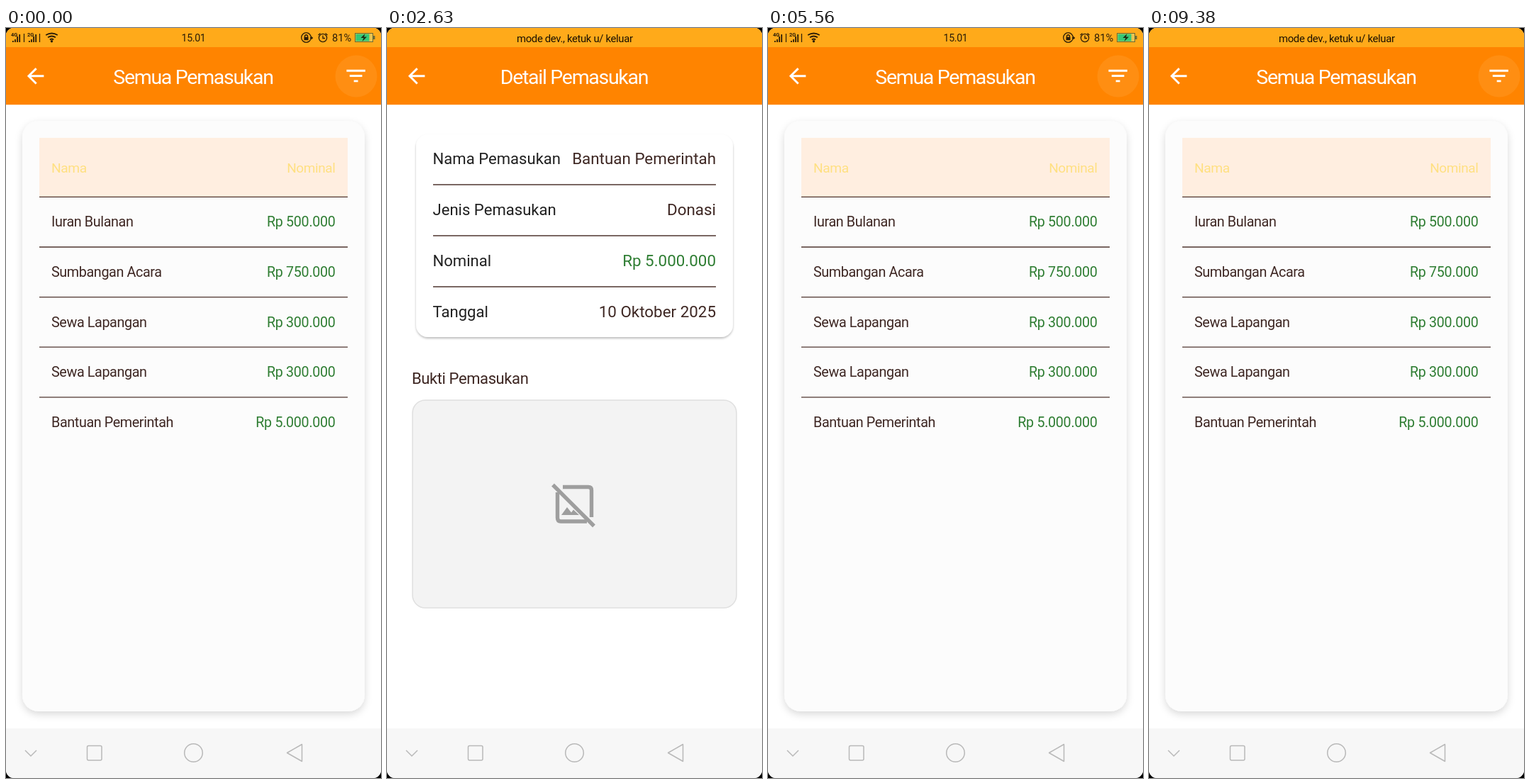
An HTML page for the animation above (9.44 s loop, 529x1058 px).

```html
<!DOCTYPE html>
<html lang="id">
<head>
<meta charset="utf-8">
<title>Semua Pemasukan</title>
<style>
html, body { margin: 0; width: 100%; height: 100%; overflow: hidden; background: #000; }
svg { display: block; width: 100%; height: 100%; font-family: Roboto, "Open Sans", sans-serif; }
.title { letter-spacing: -1.3px; }
.cell { letter-spacing: -.4px; }
.sum { letter-spacing: -.25px; }
.small { letter-spacing: -.35px; }
</style>
</head>
<body>
<svg id="stage" viewBox="0 0 529 1058" preserveAspectRatio="none">
  <defs>
    <clipPath id="screen"><rect width="529" height="1058" rx="11"/></clipPath>
    <clipPath id="pages"><rect width="529" height="988"/></clipPath>
    <clipPath id="rowClip"><rect id="rowBox" x="47" width="435" height="70"/></clipPath>
    <radialGradient id="ink">
      <stop offset="0" stop-opacity=".085"/>
      <stop offset=".7" stop-opacity=".07"/>
      <stop offset="1" stop-opacity="0"/>
    </radialGradient>
    <filter id="soft" x="-10%" y="-10%" width="120%" height="120%">
      <feDropShadow dx="0" dy="4" stdDeviation="5.5" flood-opacity=".15"/>
    </filter>
    <filter id="tight" x="-10%" y="-10%" width="120%" height="120%">
      <feDropShadow dx="0" dy="2" stdDeviation="1.6" flood-opacity=".26"/>
    </filter>
  </defs>
  <g clip-path="url(#screen)">
    <rect width="529" height="1058" fill="#fff"/>
    <g clip-path="url(#pages)">
      <g id="list"></g>
      <g id="detail"></g>
    </g>
    <rect width="529" height="27" fill="#ffaa1a"/>
    <g id="icons"></g>
    <text id="toast" class="small" x="264.8" y="19.5" font-size="14.9" text-anchor="middle" fill="#1c1202">mode dev., ketuk u/ keluar</text>
    <rect y="988" width="529" height="70" fill="#f7f7f7"/>
    <g fill="none" stroke="#b9b9b9" stroke-width="1.5">
      <path d="M27 1019l8 8 8-8"/>
      <rect x="114.5" y="1012.5" width="20.5" height="20.5" rx="2"/>
      <circle cx="264.5" cy="1022.5" r="12.8"/>
      <path d="M396.500 1022.500L417.500 1010.500V1034.500Z" stroke-linejoin="round"/>
    </g>
  </g>
</svg>
<script>
const LOOP = 9440;
const BROWN = '#3e2723', GREEN = '#2e7d32', RULE = '#4e342e';
const ROW_TOP = 239, ROW_STEP = 70.6;

const rows = [
  ['Iuran Bulanan', 'Rp 500.000'],
  ['Sumbangan Acara', 'Rp 750.000'],
  ['Sewa Lapangan', 'Rp 300.000'],
  ['Sewa Lapangan', 'Rp 300.000'],
  ['Bantuan Pemerintah', 'Rp 5.000.000']
];
// Each visit: tapped row, touch point, and times of touch, opening and return.
const visits = [
  { row: 4, x: 410, tap: 1780, push: 1930, pop: 3520 },
  { row: 1, x: 400, tap: 5650, push: 5800, pop: 7600 }
];
// Status bar swaps between icons and notice.
const swaps = [1730, 4815, 7880], SWAP_FADE = 200;

const $ = id => document.getElementById(id);
const clamp = v => Math.max(0, Math.min(1, v));
const ramp = (t, start, length) => clamp((t - start) / length);
const set = (el, attrs) => { for (const k in attrs) el.setAttribute(k, attrs[k]); };

const label = (s, x, y, size, fill, anchor = 'start', extra = '') =>
  `<text x="${x}" y="${y}" font-size="${size}" fill="${fill}" text-anchor="${anchor}" ${extra}>${s}</text>`;
const rule = (x1, x2, y) =>
  `<path d="M${x1} ${y}H${x2}" stroke="${RULE}" stroke-width="1.3"/>`;
// Toolbar glyph on a 24 unit grid.
const glyph = (x, y, d) =>
  `<path transform="translate(${x} ${y}) scale(1.469)" fill="#fff" d="${d}"/>`;
const header = title => `
  <rect y="-20" width="529" height="128.200" fill="#ff8400"/>
  ${glyph(24, 50.2, 'M20 11H7.830L13.420 5.410L12 4L4 12L12 20L13.410 18.590L7.830 13H20Z')}
  ${label(title, 264, 78.5, 28.5, '#fff', 'middle', 'class="title"')}`;

function buildList() {
  const body = rows.map(([name, sum], i) => {
    const top = ROW_TOP + i * ROW_STEP;
    return rule(47, 482, top - .6) +
      label(name, 64, top + 41.4, 19.8, BROWN, 'start', 'class="cell"') +
      label(sum, 464.6, top + 41.4, 19.6, GREEN, 'end', 'class="sum"');
  }).join('');
  $('list').innerHTML = `
    <rect x="-20" y="-20" width="569" height="1030" fill="#fff"/>
    ${header('Semua Pemasukan')}
    <circle id="focus" cx="494" cy="68" r="29.5" fill="#ff8e12"/>
    ${glyph(476, 49.9, 'M10 18H14V16H10ZM3 6V8H21V6ZM6 13H18V11H6Z')}
    <rect x="23" y="131" width="483" height="833" rx="23" fill="#fcfcfc" filter="url(#soft)"/>
    <rect x="47" y="155" width="435" height="84" fill="#ffeee0"/>
    ${label('Nama', 64, 204, 19.2, '#ffe082', 'start', 'class="cell"')}
    ${label('Nominal', 464.5, 204, 19, '#ffe082', 'end', 'class="cell"')}
    <g clip-path="url(#rowClip)">
      <rect id="hover" x="47" width="435" height="70" fill="#eee"/>
      <circle id="ripple" fill="url(#ink)"/>
    </g>
    ${body}`;
}

function buildDetail() {
  const fields = ['Nama Pemasukan', 'Jenis Pemasukan', 'Nominal', 'Tanggal'];
  const values = ['', 'Donasi', '', '10 Oktober 2025'];
  const body = fields.map((f, i) => {
    const y = 192 + 72 * i;
    return label(f, 64.5, y, 22.1, '#212121') +
      label(values[i], 464, y, 22.4, i === 2 ? GREEN : BROWN, 'end', `id="value${i}"`) +
      (i < 3 ? rule(65, 464, y + 29) : '');
  }).join('');
  $('detail').innerHTML = `
    <rect width="529" height="988" fill="#fff"/>
    ${header('Detail Pemasukan')}
    <rect x="41" y="150" width="447" height="286" rx="17" fill="#fff" filter="url(#tight)"/>
    ${body}
    ${label('Bukti Pemasukan', 35, 502, 22, BROWN, 'start', 'class="cell"')}
    <rect x="36" y="525" width="457" height="293" rx="18" fill="#f3f3f3" stroke="#e0e0e0" stroke-width="1.6"/>
    <g fill="none" stroke="#9e9e9e" stroke-width="5.4">
      <path d="M248 647.500H284Q288.500 647.500 288.500 652V690"/>
      <path d="M240.500 655V691Q240.500 696 245 696H282"/>
      <path d="M234 644.500L292 702.500"/>
    </g>
    <path d="M246 687L254 676L260 683.500L263 679.500L271 687Z" fill="#9e9e9e"/>`;
}

function buildIcons() {
  const ink = '#2a1d08';
  const signal = (x, tag) => label(tag, x, 12, 7.5, ink, 'start', 'font-weight="700"') +
    [4, 6, 8, 11].map((h, i) =>
      `<rect x="${x + 2 + i * 3.1}" y="${20 - h + (i < 2 ? 2 : 0)}" width="1.8" height="${h - (i < 2 ? 2 : 0)}" fill="${ink}"/>`).join('');
  const arcs = [3, 6.2, 9.4].map(r =>
    `<path d="M${64.5 - r * .88} ${19.5 - r}Q64.500 ${19 - r * 1.5} ${64.5 + r * .88} ${19.5 - r}"/>`).join('');
  $('icons').innerHTML = `
    ${signal(7, '4G')}${signal(30, '2G')}
    <path d="M25.500 8V20M47.500 8V20" stroke="${ink}" stroke-width="1.2"/>
    <g fill="none" stroke="${ink}" stroke-width="1.8">${arcs}</g>
    <circle cx="64.5" cy="18.7" r="1.7" fill="${ink}"/>
    ${label('15.01', 264.5, 19, 14.2, ink, 'middle', 'class="small"')}
    <g fill="none" stroke="${ink}" stroke-width="1.3">
      <circle cx="423.5" cy="13.500" r="6.8"/>
      <path d="M421.500 13V11Q423.500 8.500 425.500 11V13M429 14H433M431 12V16"/>
      <circle cx="447" cy="14" r="5.6"/>
      <path d="M447 10.500V14.500H450M440.500 10L443.500 7.500M453.500 10L450.500 7.500"/>
    </g>
    <rect x="420.5" y="12.7" width="6" height="4.5" fill="${ink}"/>
    ${label('81%', 460, 18.500, 14.6, ink)}
    <rect x="492.5" y="7.5" width="25" height="12" fill="#e9c552" stroke="#6c6a35"/>
    <rect x="493.5" y="8.500" width="19" height="10" fill="#35c777"/>
    <rect x="518" y="11" width="2.500" height="5" fill="#6c6a35"/>
    <path d="M506.500 8L500.500 14H504.500L502.500 19L509 12.500H505Z" fill="#1d2a12"/>`;
}

const zoom = (el, s) =>
  el.setAttribute('transform', `translate(264.5 494) scale(${s}) translate(-264.5 -494)`);

function drawStatus(t) {
  let icons = 1, toast = 0;
  swaps.forEach((start, i) => {
    if (t < start) return;
    const out = 1 - ramp(t, start, SWAP_FADE);
    const into = ramp(t, start + SWAP_FADE, SWAP_FADE);
    [icons, toast] = i % 2 ? [into, out] : [out, into];
  });
  set($('icons'), { opacity: icons });
  set($('toast'), { opacity: toast });
}

function drawPages(t) {
  const v = visits.findLast(v => t >= v.tap);
  const open = !!v && t >= v.push && t < v.pop;
  let hover = 0, focus = 1, inkOn = 0, listScale = 1;

  if (v) {
    const top = ROW_TOP + v.row * ROW_STEP;
    const back = ramp(t, v.pop + 120, 200);
    hover = t < v.pop ? ramp(t, v.tap, 130) : 1 - back;
    focus = t < v.push ? 1 : back;
    inkOn = t < v.push ? 1 : 0;
    if (t >= v.pop) listScale = 1 + .018 * (1 - ramp(t, v.pop, 130)) ** 2;
    set($('rowBox'), { y: top - .9 });
    set($('hover'), { y: top - .9 });
    set($('ripple'), { cx: v.x, cy: top + 36, r: 15 + .45 * (t - v.tap) });
  }
  set($('hover'), { opacity: hover });
  set($('ripple'), { opacity: inkOn });
  set($('focus'), { opacity: focus });
  zoom($('list'), listScale);

  set($('detail'), { visibility: open ? 'visible' : 'hidden' });
  if (open) {
    $('value0').textContent = rows[v.row][0];
    $('value2').textContent = rows[v.row][1];
    set($('detail'), { opacity: ramp(t, v.push, 40) });
    zoom($('detail'), 1 - .03 * (1 - ramp(t, v.push, 120)) ** 2);
  }
}

function draw(t) {
  drawStatus(t);
  drawPages(t);
}

buildList();
buildDetail();
buildIcons();
const begin = performance.now();
function tick() {
  draw((performance.now() - begin) % LOOP);
  requestAnimationFrame(tick);
}
tick();
</script>
</body>
</html>
```
